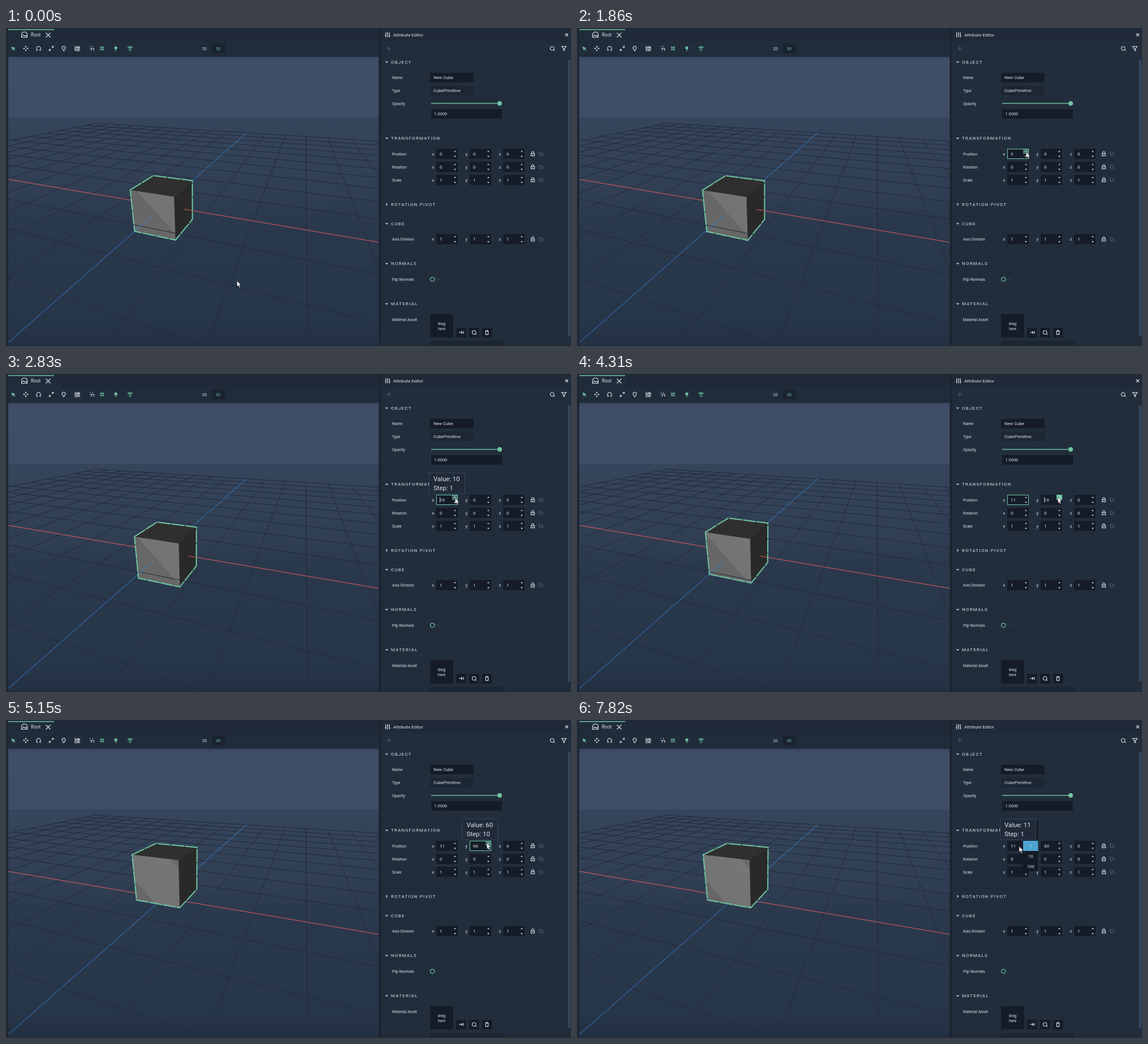
An HTML page that plays this animation: 998x561 px, repeating every 8000 ms.

```html
<!DOCTYPE html>
<html lang="en">
<head>
<meta charset="utf-8">
<title>Attribute Editor</title>
<style>
html, body { margin: 0; width: 100%; height: 100%; overflow: hidden; background: #1d2735; }
svg { display: block; width: 998px; height: 561px; font-family: Roboto, sans-serif; }
text { fill: #dde3ea; white-space: pre; }
.line { fill: none; stroke: #dbe1e8; stroke-width: 1.1; }
.green { stroke: #6fc6a3; }
.dim { stroke: #526072; }
</style>
</head>
<body>
<svg id="stage" viewBox="0 0 998 561">
  <defs>
    <clipPath id="view"><rect x="4" y="51" width="654.5" height="509"/></clipPath>
    <linearGradient id="sky" gradientUnits="userSpaceOnUse" x1="0" y1="51" x2="0" y2="560">
      <stop offset="0" stop-color="#3a4961"/>
      <stop offset=".015" stop-color="#3f4e67"/>
      <stop offset=".21" stop-color="#3e4d65"/>
      <stop offset=".211" stop-color="#36455b"/>
      <stop offset=".48" stop-color="#303e53"/>
      <stop offset=".56" stop-color="#2b394d"/>
      <stop offset=".92" stop-color="#273549"/>
      <stop offset="1" stop-color="#233042"/>
    </linearGradient>
    <linearGradient id="shade" gradientUnits="userSpaceOnUse" x1="233" y1="289" x2="286" y2="242">
      <stop offset="0" stop-color="#676767"/>
      <stop offset="0" stop-color="#737373"/>
      <stop offset="1" stop-color="#767676"/>
      <stop offset="1" stop-color="#6a6a6a"/>
    </linearGradient>
  </defs>
  <g clip-path="url(#view)">
    <rect x="4" y="51" width="655" height="510" fill="url(#sky)"/>
    <path id="gridBack" fill="none" stroke="#202a39"/>
    <path id="redBack" stroke="#e0605a"/>
    <path id="blueBack" stroke="#2e86d8"/>
    <path id="top" fill="#2f2f2f"/>
    <path id="right" fill="#292929"/>
    <path id="front" fill="url(#shade)"/>
    <path id="gridFront" fill="none" stroke="#202a39"/>
    <path id="redFront" stroke="#e0605a"/>
    <path id="blueFront" stroke="#2e86d8"/>
    <path id="edge" fill="none" stroke="#6fc6a3" stroke-width="2" stroke-dasharray="23 1.5"/>
  </g>
  <g id="ui"></g>
  <g id="live"></g>
  <path id="cursor" d="M0 0V10.2L2.3 8.1L4 12L5.7 11.2L4 7.5H7.2Z" fill="#fff" stroke="#111822" stroke-width=".6"/>
</svg>
<script>
const $ = id => document.getElementById(id);
const LOOP = 8000;

// --- markup helpers ---
const rect = (x, y, w, h, fill, extra = '') =>
  `<rect x="${x}" y="${y}" width="${w}" height="${h}" fill="${fill}" ${extra}/>`;
const text = (x, y, s, size, extra = '') =>
  `<text x="${x}" y="${y}" font-size="${size}" ${extra}>${s}</text>`;
const icon = (x, y, d, cls = '') =>
  `<path class="line ${cls}" transform="translate(${x} ${y})" d="${d}"/>`;
const circle = (x, y, r, extra) => `<circle cx="${x}" cy="${y}" r="${r}" ${extra}/>`;
const arrows = (x, y) =>
  `<path fill="#cfd6de" d="M${x - 2} ${y - 3.4}h4l-2 -2.3zM${x - 2} ${y + 3.6}h4l-2 2.3z"/>`;

const INPUT = '#151c27';
const FIELDS = [760, 819, 878];
const AXES = ['x', 'y', 'z'];
const CROSS = 'M-3 -3L3 3M3 -3L-3 3';
const LENS = 'M2.2 2.2L4.4 4.4M3 0A3.3 3.3 0 1 1 -3.6 0A3.3 3.3 0 1 1 3 0';

function section(y, title, open = true) {
  const mark = open ? 'M-2 -1L0 1L2 -1' : 'M-1 -2L1 0L-1 2';
  const rule = y > 100 ? rect(663, y - 14, 329, 1, '#1c2633') : '';
  return rule + icon(672.5, y, mark) + text(680, y + 2.9, title, 7.9, 'letter-spacing="1.3"');
}
const label = (y, s) => text(682, y + 2.5, s, 6.85);

function vectorRow(y, name, values) {
  let out = label(y, name);
  FIELDS.forEach((x, i) => {
    out += text(x - 7.5, y + 2.5, AXES[i], 7.5) + rect(x, y - 9, 38, 18, INPUT) + arrows(x + 33, y);
    if (values) out += text(x + 6, y + 2.8, values[i], 8);
  });
  return out
    + icon(930.5, y, 'M-3 -.5h6v4h-6zM-1.9 -.5v-1.6a1.9 1.9 0 0 1 3.8 0v1.6M0 1v1.2')
    + icon(945, y, 'M-1 -3h-1.5q-1.5 1 -1.2 2.5l2 2M1 3h1.5q1.5 -1 1.2 -2.5l-2 -2M0 -3l3 3M-3 1l3 3', 'dim');
}

function drawUi() {
  let s = rect(0, 0, 4, 561, '#1d2735') + rect(4, 0, 655, 51, '#212c3b')
    + rect(86, 0, 573, 24, '#1f2937') + rect(4, 2, 81, 1.5, '#6fc6a3')
    + rect(658.5, 0, 4, 561, '#1b2431') + rect(662.5, 0, 336, 561, '#222d3c')
    + rect(662.5, 0, 336, 24, '#1f2937') + rect(4, 560, 994, 1, '#1d2735')
    + rect(992.5, 56, 4.5, 487, '#35465d');

  // tab and toolbar
  s += icon(32.5, 12, 'M-5 4.5V-1Q-4 -5 0 -5T5 -1V4.5ZM-4 3L-1.5 0L1 2.5L2.5 1L4.5 3')
    + text(44, 15, 'Root', 8.2) + icon(74.5, 12.5, 'M-4 -4L4 4M4 -4L-4 4')
    + `<path fill="#6fc6a3" d="M9.5 32.5L16.5 35.5L13.8 36.4L16.5 39.1L15.6 40L12.9 37.3L12 40Z"/>`
    + icon(35, 36, 'M-4 0H-1.5M1.5 0H4M0 -4V-1.5M0 1.5V4M-2.8 -1.2L-4 0L-2.8 1.2M2.8 -1.2L4 0L2.8 1.2M-1.2 -2.8L0 -4L1.2 -2.8M-1.2 2.8L0 4L1.2 2.8')
    + icon(57.5, 36, 'M-1.8 3.2A3.6 3.6 0 1 1 1.8 3.2M-4 3.4H-1.6M1.6 3.4H4')
    + icon(80, 36, 'M1 -1L3.6 -3.6M1.2 -3.7H3.7V-1.2M-1 1L-3.6 3.6M-1.2 3.7H-3.7V1.2')
    + icon(102, 36, 'M0 4.3Q-3 .5 -3 -1A3 3 0 0 1 3 -1Q3 .5 0 4.3ZM0 -1.6V-.4')
    + icon(126.5, 36, 'M-4.5 -4.5V4H4.5M-2.5 -2L0 -3.5L3.5 -2.5V1.2L1 2.5L-2.5 1.5ZM-2.5 -2L1 -1L3.5 -2.5M1 -1V2.5')
    + icon(151.5, 36, 'M-3.5 -3.5h1.4M-3.5 -.5h1.4M.5 -3.5h1.4M-1 4V1.8A2.3 2.3 0 0 1 3.6 1.8V4')
    + icon(169.5, 36, 'M-3.8 -1.8H3.8M-3.8 1.8H3.8M-1.8 -3.8V3.8M1.8 -3.8V3.8', 'green')
    + circle(194, 35, 2.6, 'fill="#6fc6a3"') + icon(194, 38.8, 'M-1.2 -1H1.2M-1 .8H1', 'green')
    + icon(219, 36, 'M-4 -1.8Q0 -5 4 -1.8Q0 .8 -4 -1.8M-2.5 2H2.5M-1.5 4H1.5M0 -2.5V-1', 'green')
    + rect(363, 27, 24, 18, '#1a2330')
    + text(350.5, 38.5, '2D', 6.8, 'text-anchor="middle"')
    + text(375, 38.5, '3D', 6.8, 'text-anchor="middle" style="fill:#6fc6a3"');

  // panel header
  s += icon(674, 12, 'M-3.3 -4.5V4.5M0 -4.5V4.5M3.3 -4.5V4.5M-4.6 1.5h2.6M-1.3 -2h2.6M2 2h2.6')
    + text(684, 15, 'Attribute Editor', 7.9) + icon(990.5, 12, 'M-2.5 -2.5L2.5 2.5M2.5 -2.5L-2.5 2.5')
    + icon(676, 36, 'M-3.5 0H3.5M0 -3.5V3.5', 'dim') + icon(965, 36, LENS)
    + icon(985.5, 36, 'M-4 -3.5H4L1 .3V4L-1 2.8V.3Z');

  // object
  s += section(60, 'OBJECT') + label(87.5, 'Name') + rect(749, 79, 77, 17, INPUT)
    + text(755, 90.2, 'New Cube', 7.7) + label(110.5, 'Type') + rect(749, 102, 77, 17, '#1d2633')
    + text(755, 113.2, 'CubePrimitive', 7.7) + label(133, 'Opacity')
    + rect(751, 132.3, 121, 1.4, '#6fc6a3') + circle(872, 133, 4, 'fill="#6fc6a3"')
    + rect(751, 143, 125, 17, INPUT) + text(756.5, 154.2, '1.0000', 7.4);

  // transformation and cube
  s += section(194.5, 'TRANSFORMATION') + vectorRow(222, 'Position')
    + vectorRow(245, 'Rotation', [0, 0, 0]) + vectorRow(268, 'Scale', [1, 1, 1])
    + section(311, 'ROTATION PIVOT', false) + section(345, 'CUBE')
    + vectorRow(372.5, 'Axis Division', [1, 1, 1]);

  // normals and material
  s += section(415.5, 'NORMALS') + label(443.5, 'Flip Normals') + rect(757, 442.5, 11, 1.5, '#2e3a49')
    + circle(753.2, 443.3, 3.5, 'fill="#1b2431" stroke="#6fc6a3" stroke-width="1.2"')
    + section(486.5, 'MATERIAL') + label(514.5, 'Material Asset') + rect(749, 505, 41, 41, INPUT)
    + text(769.5, 524, 'drag', 6.8, 'text-anchor="middle"')
    + text(769.5, 533, 'here', 6.8, 'text-anchor="middle"')
    + [795, 818, 841].map(x => rect(x, 529, 17.5, 17, INPUT)).join('')
    + icon(804, 537, 'M-4 0H2M0 -2L2 0L0 2M4 -2.5V2.5') + icon(827, 537, LENS.replace('4.4 4.4', '4 4'))
    + icon(849.5, 537, 'M-2.2 -2V3.6H2.2V-2M-3 -2.4H3M-1 -3.6H1') + rect(749, 552, 130, 8, '#1c2532');
  $('ui').innerHTML = s;
}

// --- perspective: origin, vanishing points and weight per grid unit ---
const ORIGIN = [278.6, 313.6];
const VANISH = [[-1021, 93], [331, 1359], [529.6, 93]];
const WEIGHT = [.0542, .0673, .14];

function project(...p) {
  const k = p.map((v, i) => -v * WEIGHT[i]);
  const w = 1 + k[0] + k[1] + k[2];
  return [0, 1].map(c => ((ORIGIN[c] + k.reduce((a, v, i) => a + v * VANISH[i][c], 0)) / w).toFixed(2));
}
const path = pts => 'M' + pts.map(p => project(...p).join(' ')).join('L');
const farX = z => Math.min(10, (.9 - WEIGHT[2] * z) / WEIGHT[0]);
const farZ = x => Math.min(10, (.9 - WEIGHT[0] * x) / WEIGHT[2]);
const alongX = (z, from = -10, to = farX(z)) => path([[from, 0, z], [to, 0, z]]);
const alongZ = (x, from = -10, to = farZ(x)) => path([[x, 0, from], [x, 0, to]]);

function drawGrid() {
  let back = '', front = '';
  for (let i = 1; i <= 10; i++) {
    back += alongX(-i) + alongZ(-i);
    front += alongZ(i);
    if (farX(i) > -10) front += alongX(i);
  }
  $('gridBack').setAttribute('d', back);
  $('gridFront').setAttribute('d', front);
}

function drawCube(px, py) {
  const h = .5, x = px / 100, y = py / 100;
  const v = (a, b, c) => [x + a * h, y + b * h, c * h];
  const a = v(-1, 1, 1), b = v(-1, 1, -1), c = v(1, 1, -1), d = v(1, 1, 1);
  const a2 = v(-1, -1, 1), c2 = v(1, -1, -1), d2 = v(1, -1, 1);
  const set = (id, value) => $(id).setAttribute('d', value);
  set('top', path([a, b, c, d]) + 'Z');
  set('right', path([d, c, c2, d2]) + 'Z');
  set('front', path([a, d, d2, a2]) + 'Z');
  set('edge', path([a, b, c, c2, d2, a2]) + 'Z');
  set('redBack', alongX(0, -10, x + h));
  set('redFront', alongX(0, x + h));
  set('blueBack', alongZ(0, -10, h));
  set('blueFront', alongZ(0, h));
}

// --- timeline ---
const X_STEPS = [1480, 1610, 1860, 1990, 2130, 2280, 2400, 2560, 2690, 2830, 2980];
const Y_STEPS = [4310, 4450, 4580, 4720, 4860, 5010];
const MOVES = [
  { from: 280, to: 1090, n: 7, x: 793.3, y: 218.8 },
  { from: 3390, to: 3630, n: 3, x: 849.3, y: 217 },
  { from: 5900, to: 6870, n: 8, x: 781, y: 222.8 }
];
const count = (steps, t) => steps.filter(s => t >= s).length;
const within = (t, a, b) => t >= a && t < b;

function pointer(t) {
  let x = 408, y = 446;
  for (const m of MOVES) {
    if (t < m.from) break;
    const k = Math.min(m.n, Math.floor((t - m.from) / ((m.to - m.from) / (m.n - 1)) + 1e-6) + 1) / m.n;
    const e = k * k * (3 - 2 * k);
    x += (m.x - x) * e;
    y += (m.y - y) * e;
  }
  return [x, y];
}

function tooltip(x, value, step) {
  const w = value > 9 ? 64 : 58;
  return rect(x + .5, 174.5, w - 1, 36.5, '#202a38', 'stroke="#36445a"')
    + text(x + 8, 189.3, 'Value: ' + value, 11.4) + text(x + 8, 204.5, 'Step: ' + step, 11.4);
}

function dropdown(t) {
  let s = rect(788, 177, 26.5, 90, '#131a25') + rect(788, 213, 26.5, 18, '#4fa3d1');
  ['0.01', '0.1', '1', '10', '100'].forEach((v, i) => {
    s += text(801.3, 188.8 + i * 18, v, 7.8, 'text-anchor="middle"');
  });
  return `<g opacity="${t < 7550 ? .6 : 1}">${s}</g>`;
}

function render(t) {
  const x = count(X_STEPS, t), y = count(Y_STEPS, t) * 10;
  drawCube(x, y);

  let s = '';
  const hover = (i, fill) => rect(FIELDS[i] + 28, 213, 10, 9, fill) + arrows(FIELDS[i] + 33, 222);
  if (within(t, 1350, 3390)) s += hover(0, '#487c72');
  if (within(t, 3930, 4450)) s += hover(1, '#6fc6a3');
  else if (within(t, 3630, 5900)) s += hover(1, '#487c72');

  const focus = within(t, 1480, 4450) ? 0 : within(t, 4450, 7430) ? 1 : -1;
  if (focus >= 0) s += rect(FIELDS[focus] + .5, 213.5, 37, 17, 'none', 'stroke="#6fc6a3"');

  [x, y, 0].forEach((v, i) => { s += text(FIELDS[i] + 6, 224.8, v, 8); });
  if (within(t, 2830, 2980)) s += rect(766, 217, .8, 10, '#dde3ea');
  if (within(t, 3930, 4450) || within(t, 5280, 5400)) s += rect(825, 217, .8, 10, '#dde3ea');

  if (t >= 7430) s += dropdown(t);
  if (within(t, 1990, 3250) || t >= 7820) s += tooltip(747, x, 1);
  if (within(t, 4720, 5900)) s += tooltip(805.5, y, 10);
  $('live').innerHTML = s;

  $('cursor').setAttribute('transform', `translate(${pointer(t).join(' ')})`);
}

drawUi();
drawGrid();
render(0);
const start = performance.now();
(function tick() {
  render((performance.now() - start) % LOOP);
  requestAnimationFrame(tick);
})();
</script>
</body>
</html>
```
